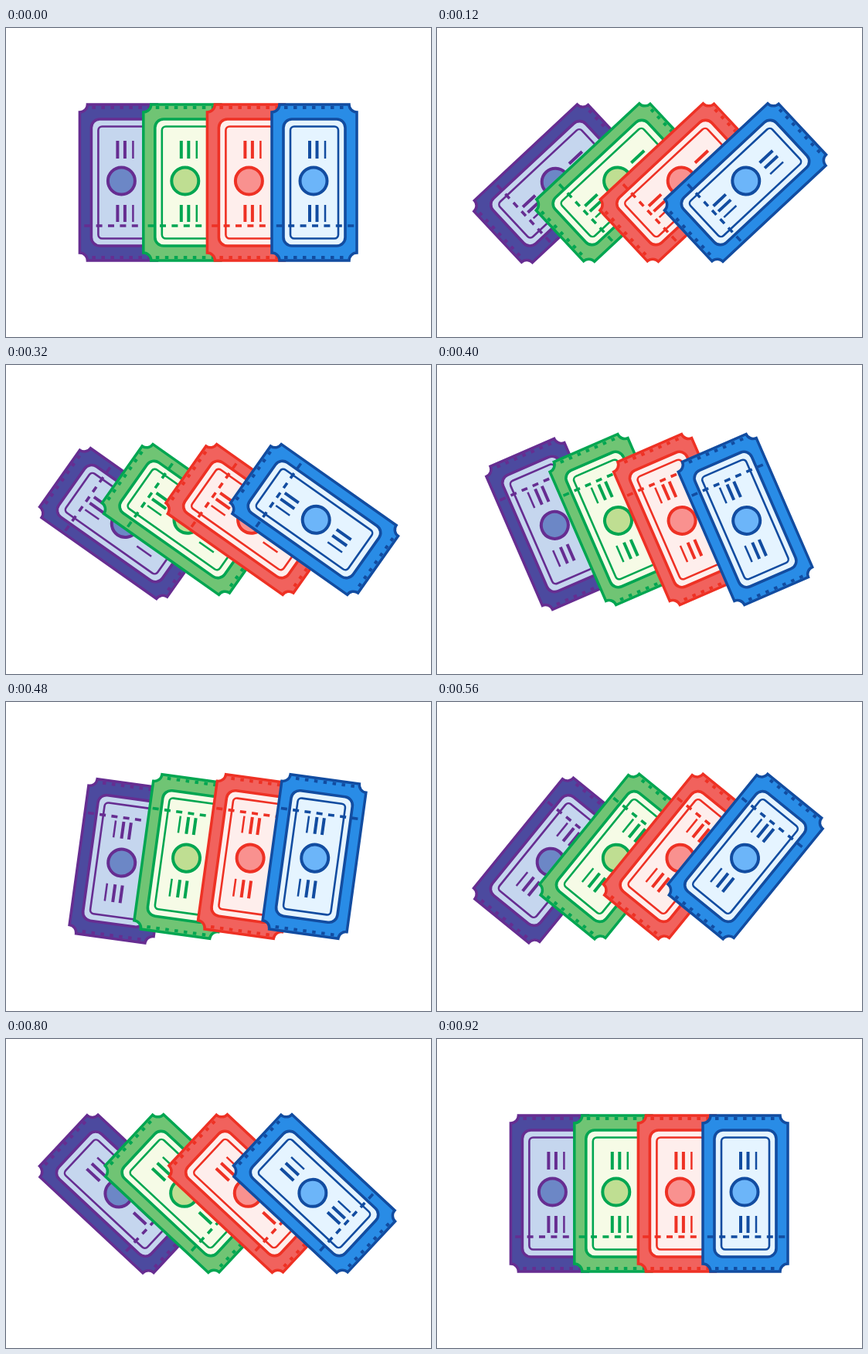
These frames come from a looping animation (550x400 px, 0.96 s). An HTML page with a canvas:

```html
<!DOCTYPE html>
<html lang="en">
<head>
<meta charset="utf-8">
<title>Spinning tickets</title>
<style>
  html, body { margin: 0; width: 100%; height: 100%; overflow: hidden; background: #fff; }
  canvas { display: block; }
</style>
</head>
<body>
<canvas id="stage" width="550" height="400"></canvas>
<script>
const ctx = document.getElementById('stage').getContext('2d');
const STEP_MS = 40, STEPS = 24;

// x, y: pivot; dx, dy: ticket centre relative to the pivot
const tickets = [
  { x: 149.9, y: 203, dx: 0.5, dy: -3, body: '#4c4a9f', line: '#662d91', panel: '#c5d6ee', disc: '#6c87c6' },
  { x: 232.8, y: 200, dx: 0, dy: 0, body: '#70c474', line: '#00a651', panel: '#f6fbe6', disc: '#bfde92' },
  { x: 315.4, y: 200, dx: 0, dy: 0, body: '#f1625d', line: '#ee3124', panel: '#feeeec', disc: '#f9918f' },
  { x: 399, y: 200, dx: 0, dy: 0, body: '#298ce6', line: '#124ca0', panel: '#e5f4ff', disc: '#6cb5f9' }
];

// Rectangle with a concave notch at each corner
function outline(w, h, r) {
  const p = new Path2D();
  p.arc(-w, -h, r, Math.PI / 2, 0, true);
  p.arc(w, -h, r, Math.PI, Math.PI / 2, true);
  p.arc(w, h, r, -Math.PI / 2, Math.PI, true);
  p.arc(-w, h, r, 0, -Math.PI / 2, true);
  p.closePath();
  return p;
}

function roundRect(w, h, r) {
  const p = new Path2D();
  p.roundRect(-w, -h, 2 * w, 2 * h, r);
  return p;
}

const disc = new Path2D();
disc.arc(-1, -2, 17.5, 0, 2 * Math.PI);
const edge = outline(55, 101, 10);
const frame = roundRect(40, 82, 11);
const inset = roundRect(31, 72.5, 5);

function shape(path, fill, width) {
  ctx.fillStyle = fill;
  ctx.fill(path);
  ctx.lineWidth = width;
  ctx.stroke(path);
}

function line(x1, y1, x2, y2, width, dash = []) {
  ctx.lineWidth = width;
  ctx.setLineDash(dash);
  ctx.beginPath();
  ctx.moveTo(x1, y1);
  ctx.lineTo(x2, y2);
  ctx.stroke();
  ctx.setLineDash([]);
}

function drawTicket(t, angle) {
  ctx.save();
  ctx.translate(t.x, t.y);
  ctx.rotate(angle);
  ctx.translate(t.dx, t.dy);
  ctx.strokeStyle = t.line;
  shape(edge, t.body, 3.5);
  for (const y of [-97, 97]) line(-39, y, 40, y, 4, [4.5, 7.5]);
  shape(frame, t.panel, 3.6);
  shape(inset, t.panel, 2.6);
  shape(disc, t.disc, 4);
  for (const [x, width] of [[-6, 4], [3.5, 4], [14, 2.5]]) {
    line(x, -54, x, -31, width);
    line(x, 29, x, 51, width);
  }
  line(-49.2, 56, 52, 56, 3.6, [8, 7.4]);
  ctx.restore();
}

function render() {
  const step = Math.floor(performance.now() / STEP_MS) % STEPS;
  const angle = step / (STEPS - 1) * 2 * Math.PI;
  ctx.clearRect(0, 0, 550, 400);
  for (const t of tickets) drawTicket(t, angle);
  requestAnimationFrame(render);
}
render();
</script>
</body>
</html>
```
